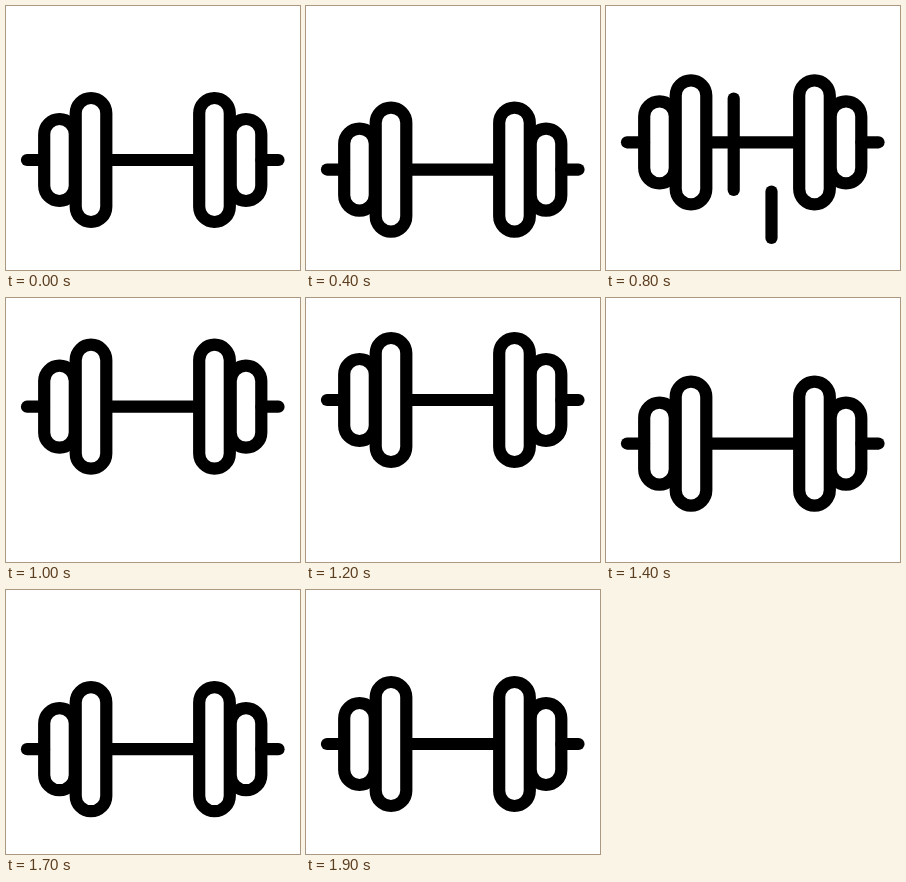
An HTML page for the animation above (2 s loop, 294x264 px).

```html
<!DOCTYPE html>
<html lang="en">
<head>
<meta charset="utf-8">
<title>Dumbbell</title>
<style>
  html, body { margin: 0; width: 100%; height: 100%; overflow: hidden; background: #fff; }
  svg { display: block; width: 100vw; height: 100vh; }
</style>
</head>
<body>
<svg viewBox="0 0 294 264" fill="none" stroke="#000" stroke-width="12.2" stroke-linecap="round">
  <defs>
    <g id="half">
      <rect x="-15.3" y="-62" width="30.6" height="124" rx="15.3" transform="translate(85)"/>
      <rect x="-15.3" y="-41" width="30.6" height="82" rx="15.3" transform="translate(53.5)"/>
      <path d="M21 0H38"/>
    </g>
  </defs>
  <g id="dumbbell">
    <use href="#half"/>
    <use href="#half" transform="translate(293.5) scale(-1 1)"/>
    <path d="M102 0H191"/>
  </g>
  <path id="leftStreak"/>
  <path id="rightStreak"/>
</svg>
<script>
const LOOP = 2000, STEP = 100;
const REST = 154, LOW = 169, HIGH = 102, FLOOR = 232;
const byId = id => document.getElementById(id);
const dumbbell = byId('dumbbell');

// Cosine ease; skew below 1 gives a quick start and a long settle.
function ease(t, start, end, from, to, skew = 1) {
  const u = Math.min(1, Math.max(0, (t - start) / (end - start)));
  return from + (to - from) * (1 - Math.cos(Math.PI * u ** skew)) / 2;
}

function height(t) {
  if (t < 660) return ease(t, 0, 680, REST, LOW);
  if (t < 1200) return ease(t, 660, 1180, LOW, HIGH, 0.54);
  if (t < 1535) return ease(t, 1200, 1535, HIGH, LOW);
  return ease(t, 1535, 1810, LOW, REST);
}

// A speed line shoots up from the floor, its tail following later.
function streak(id, x, age) {
  const head = FLOOR - 0.93 * age;
  const tail = FLOOR - 0.48 * Math.max(0, age - 50);
  byId(id).setAttribute('d', age > 0 && age < 200 ? `M${x} ${head}V${tail}` : '');
}

function draw(now) {
  const t = Math.floor(now % LOOP / STEP) * STEP;
  dumbbell.setAttribute('transform', `translate(0 ${height(t)})`);
  streak('leftStreak', 127.7, t - 650);
  streak('rightStreak', 165.5, t - 750);
}

const begin = performance.now();
function tick() {
  draw(performance.now() - begin);
  requestAnimationFrame(tick);
}
tick();
</script>
</body>
</html>
```
